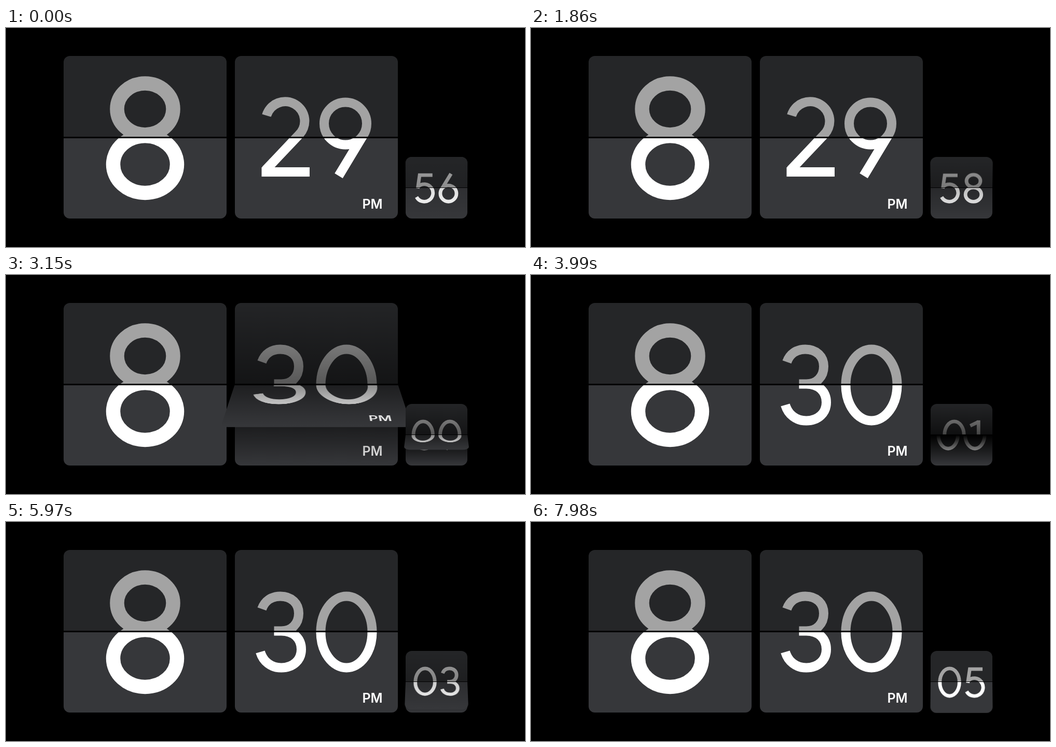
An HTML page for the animation above (8000 ms loop, 1000 by 423 pixels).

```html
<!DOCTYPE html>
<html lang="en">
<head>
<meta charset="utf-8">
<title>Flip clock</title>
<style>
  html, body { margin: 0; width: 100%; height: 100%; overflow: hidden; background: #000; }
  #stage { position: relative; width: 1000px; height: 423px; overflow: hidden; }
  .card { position: absolute; perspective: 945px; }
  .half { position: absolute; left: 0; width: 100%; height: 50%; overflow: hidden; }
  .top { top: 0; border-radius: 12px 12px 0 0; background: #252628; color: #a3a3a3; transform-origin: 50% 100%; }
  .bottom { top: 50%; border-radius: 0 0 12px 12px; background: #36373a; color: #fff; transform-origin: 50% 0; }
  .half svg { position: absolute; left: 0; width: 100%; height: 200%; }
  .top svg { top: 0; }
  .bottom svg { bottom: 0; }
  .shade { position: absolute; inset: 0; opacity: 0; }
  .top .shade { background: linear-gradient(to top, #000, rgba(0, 0, 0, .1)); }
  .bottom .shade { background: linear-gradient(to bottom, #000, rgba(0, 0, 0, 0)); }
  .hinge { position: absolute; left: -5px; right: -5px; top: calc(50% - 1px); background: #000; }
</style>
</head>
<body>
<div id="stage"></div>
<script>
const LOOP = 8000, STEP = 30, CYCLE = 30, LEAD = 2, HALF = 15;
const UNIT = 314, GAP = 19;

const oval = (x, y, rx, ry) =>
  `M${x - rx} ${y}a${rx} ${ry} 0 1 1 ${2 * rx} 0a${rx} ${ry} 0 1 1 ${-2 * rx} 0z`;

// Each digit: width and centre-line path, with y = 0 at mid height.
const DIGITS = [
  [117, oval(58.5, 0, 49.5, 69)],
  [55, 'M46 74.5V-74.5M4 -47L46 -67'],
  [93, 'M10 -43.5A37.5 37.5 0 1 1 72.2 -6L8 62M.5 65.5H93'],
  [97, 'M11.5 -44.5C17 -60 30 -69 47 -69C69 -69 82.5 -55 82.5 -36C82.5 -16 69 -2 49 -2H35' +
       'M49 -2C73 -2 87.5 13 87.5 33.5C87.5 54 72 69 49 69C29 69 14 57 8.5 38.5'],
  [111, 'M111 43H16L79.5 -70M85 74.5V-74.5'],
  [102, 'M90 -66H25L15 2M18 -8A44.5 44.5 0 1 1 9 46'],
  [100, oval(50, 28, 41, 41) + 'M15 6.7L63 -73'],
  [98, 'M0 -66H84L31 73'],
  [99, oval(49.5, -36.7, 35.4, 32.4) + oval(49.5, 33.4, 40.3, 36)],
  [100, oval(50, -28, 41, 41) + 'M85 -6.7L37 73']
];

function drawNumber(text, zoom, label) {
  let x = 0, paths = '';
  for (const c of text) {
    const [width, d] = DIGITS[c];
    paths += `<path transform="translate(${x})" d="${d}"/>`;
    x += width + GAP;
  }
  const shift = (GAP - x) / 2;
  const note = label ? `<text x="265" y="295" text-anchor="middle" fill="currentColor"
    font-family="Inter, sans-serif" font-weight="600" font-size="25">${label}</text>` : '';
  return `<g fill="none" stroke="currentColor" stroke-width="18"
    transform="translate(${UNIT / 2} 158.5) scale(${zoom}) translate(${shift})">${paths}</g>${note}`;
}

class Card {
  constructor(x, y, size, hinge, zoom = 1, label = '') {
    Object.assign(this, { zoom, label });
    this.el = document.createElement('div');
    this.el.className = 'card';
    this.el.style.cssText = `left:${x}px;top:${y}px;width:${size}px;height:${size}px`;
    document.getElementById('stage').append(this.el);
    this.backTop = this.addHalf('top');
    this.backBottom = this.addHalf('bottom');
    this.flapTop = this.addHalf('top');
    this.flapBottom = this.addHalf('bottom');
    this.el.insertAdjacentHTML('beforeend', `<div class="hinge" style="height:${hinge}px"></div>`);
  }

  addHalf(side) {
    const el = document.createElement('div');
    el.className = 'half ' + side;
    el.innerHTML = `<svg viewBox="0 0 ${UNIT} ${UNIT}"></svg><div class="shade"></div>`;
    this.el.append(el);
    return { el, svg: el.firstChild, shade: el.lastChild, text: '' };
  }

  setHalf(half, text, shade, angle = 0, visible = true) {
    if (half.text !== text) {
      half.svg.innerHTML = drawNumber(text, this.zoom, this.label);
      half.text = text;
    }
    half.shade.style.opacity = shade;
    half.el.style.transform = angle ? `rotateX(${angle}deg)` : 'none';
    half.el.style.visibility = visible ? 'visible' : 'hidden';
  }

  // n counts steps since the flip began
  flip(from, to, n) {
    const rising = Math.min(1, n / HALF);
    const fading = Math.max(0, Math.min(1, (24 - n) / HALF));
    const falling = n < HALF;
    const fall = 90 * Math.pow(rising, 1.45);
    const settle = 90 * Math.exp(-(n - HALF) / 5.7);
    this.setHalf(this.backTop, to, fading);
    this.setHalf(this.backBottom, from, rising);
    this.setHalf(this.flapTop, from, rising, -fall, falling);
    this.setHalf(this.flapBottom, to, fading, settle, !falling);
  }

  rest(text) {
    this.setHalf(this.backTop, text, 0);
    this.setHalf(this.backBottom, text, 0);
    this.setHalf(this.flapTop, text, 0, 0, false);
    this.setHalf(this.flapBottom, text, 0, 0, false);
  }
}

const hours = new Card(111, 54, UNIT, 3, 1.526);
const minutes = new Card(441, 54, UNIT, 3, 1, 'PM');
const seconds = new Card(770, 249, 119, 1.5);
const two = n => String(n % 60).padStart(2, '0');

function render(time) {
  const tick = Math.floor((time % LOOP) / STEP) + LEAD;
  const turn = Math.floor(tick / CYCLE), n = tick % CYCLE;
  const second = 56 + turn;
  seconds.flip(two(second), two(second + 1), n);
  if (second === 59) minutes.flip('29', '30', n);
  else minutes.rest(second < 59 ? '29' : '30');
}

hours.rest('8');
render(0);
let start;
requestAnimationFrame(function loop(now) {
  start ??= now;
  render(now - start);
  requestAnimationFrame(loop);
});
</script>
</body>
</html>
```
